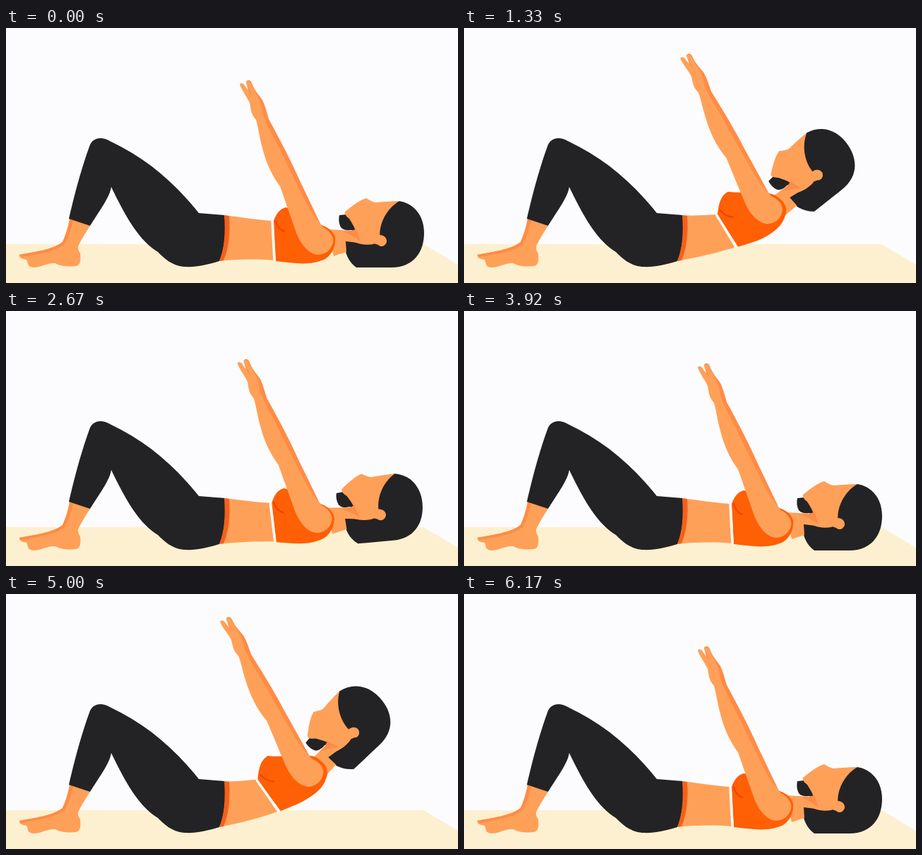
Write an HTML page that moves like this. It is 640 px wide and 361 px high and loops after 6.26 s.

```html
<!DOCTYPE html>
<html lang="en">
<head>
<meta charset="utf-8">
<title>Crunches</title>
<style>
html, body { margin: 0; width: 100%; height: 100%; overflow: hidden; background: #fcfcff; }
svg { display: block; width: 100vw; height: 100vh; }
.skin { fill: #ffa058; }
.shade { fill: #ff8b45; }
.dark { fill: #232325; }
.bra { fill: #ff5f05; }
.band { fill: #f5601c; }
.line { fill: none; stroke-linecap: round; }
</style>
</head>
<body>
<svg viewBox="0 0 640 361" preserveAspectRatio="none">
  <path fill="#fdf0d0" d="M0 306H591L640 335V361H0Z"/>

  <!-- legs -->
  <path class="skin" d="M90 269C88 282 84 294 80 303C66 314 40 317 19 321C18 326 24 327 29 328C32 333 29 337 38 339C50 339 58 332 70 333C78 338 90 338 98 337C106 337 106 327 105 319C102 314 101 311 103 307C107 299 113 289 119 280Z"/>
  <path class="shade" d="M91 270C88 284 84 295 80 303C66 314 40 317 19 321L22 324C45 320 69 317 83 306C89 296 92 284 95 273Z"/>
  <path class="skin" id="belly"/>
  <path class="dark" d="M89 270C97 235 108 195 118 168C122 155 135 153 147 160C198 184 238 218 273 262L310 265C312 290 309 314 302 330C285 335 270 339 252 338C234 336 224 326 215 317C186 300 165 258 149 225C147 240 130 262 119 280Z"/>
  <path class="band" d="M309 265L316 266C318 290 315 314 308 329L302 330C309 314 311 290 309 265Z"/>

  <!-- head and trunk -->
  <path class="dark head" d="M557 245C580 249 592 268 592 290C592 316 578 339 546 339L496 339C484 330 478 316 480 300L515 290L540 249Z"/>
  <path class="skin" id="neck"/>
  <path class="bra" id="bra"/>
  <path class="line" id="hem" stroke="#fffbf6" stroke-width="3.5"/>
  <path class="line" id="fold" stroke="#e84404" stroke-width="2"/>
  <g class="head">
    <path class="dark" d="M472 265L490 263L498 288L488 286C484 287 477 286 474 282C471 276 471 270 472 265Z"/>
    <path class="skin" d="M557 245C545 245 535 246 523 247C518 246 514 243 510 241C500 244 490 252 480 260C479 264 482 267 486 270C489 275 494 282 496 290L486 299C496 306 510 308 520 306L530 301C526 280 538 256 557 245Z"/>
    <path class="shade" d="M476 287C482 289 490 288 496 284L502 303C496 296 486 292 476 287Z"/>
    <path class="skin" d="M525 294C532 291 540 296 539 303C537 309 531 311 527 307L518 304Z"/>
  </g>

  <g id="arm">
    <path class="shade" d="M340 76C342 73 346 73 348 78C351 87 358 95 363 102C367 110 369 119 372 129C389 160 405 191 415 214L447 281L420 270L352 125Z"/>
    <path class="skin" d="M331 80C332 77 337 78 339 83L349 96L340 78C342 74 346 75 347 79L354 93C359 100 362 110 363 120C368 135 377 150 386 168C400 197 415 228 428 253C435 266 442 274 449 282C459 287 465 296 463 304C460 316 450 321 441 321C427 319 417 305 411 290L388 224C375 207 367 187 362 166C358 150 357 140 354 130C346 121 347 115 345 106C341 97 334 89 331 80Z"/>
  </g>
</svg>
<script>
const LOOP = 6260, STEP = 250 / 3, REP = 3125;
const $ = id => document.getElementById(id);
const heads = document.querySelectorAll('.head');

// Each pair holds the lying and the raised outline.
const morphs = {
  belly: ['M308 265C330 267 355 272 378 273L380 329C355 327 330 327 302 330Z',
          'M308 265C325 266 340 265 357 264L386 310C360 318 330 325 302 330Z'],
  bra: ['M379 273C383 262 388 256 396 254C403 254 420 265 447 279C462 284 468 295 466 303C465 315 458 323 452 327C430 337 410 333 382 330Z',
        'M359 264C361 250 363 238 374 232C395 235 425 230 440 237C455 246 459 256 455 266C452 277 444 286 432 293C418 302 404 305 388 310Z'],
  hem: ['M377 274L380 328', 'M358 265L385 310'],
  fold: ['M382 273C383 280 388 286 394 288', 'M363 258C366 263 374 268 381 268']
};

function mix([a, b], p) {
  const ends = b.match(/\d+/g);
  let i = 0;
  return a.replace(/\d+/g, n => (+n + (ends[i++] - n) * p).toFixed(2) + ' ');
}

const ease = x => (1 - Math.cos(Math.PI * Math.min(1, Math.max(0, x)))) / 2;
const lift = t => 1.2 * (ease((t - 830) / 680) - ease((t - 1700) / 1240));

function pose(p) {
  for (const id in morphs) $(id).setAttribute('d', mix(morphs[id], p));

  // The head turns about the ear, which rides on a shallow arc.
  const turn = -38 * p, dx = -5 * p - 26 * p * p, dy = -93 * p;
  for (const h of heads)
    h.setAttribute('transform', `translate(${dx} ${dy}) rotate(${turn} 533 301)`);

  const c = Math.cos(turn * Math.PI / 180), s = Math.sin(turn * Math.PI / 180);
  const onHead = (x, y) => [
    533 + dx + (x - 533) * c - (y - 301) * s,
    301 + dy + (x - 533) * s + (y - 301) * c
  ];
  const neck = [
    [455 - 19 * p, 285 - 45 * p], onHead(492, 287), onHead(514, 306),
    onHead(481, 302), onHead(482, 317), [464 - 14 * p, 323 - 53 * p]
  ];
  $('neck').setAttribute('d', 'M' + neck.join('L') + 'Z');

  $('arm').setAttribute('transform',
    `translate(${-12 * p} ${-50 * p + 7 * p * p}) rotate(${-3.2 * p} 440 305)`);
}

const start = performance.now();
function draw() {
  const t = (performance.now() - start) % LOOP;
  const step = Math.min(74, Math.floor((t + 5) / STEP));
  pose(lift(step * STEP % REP));
  requestAnimationFrame(draw);
}
draw();
</script>
</body>
</html>
```
